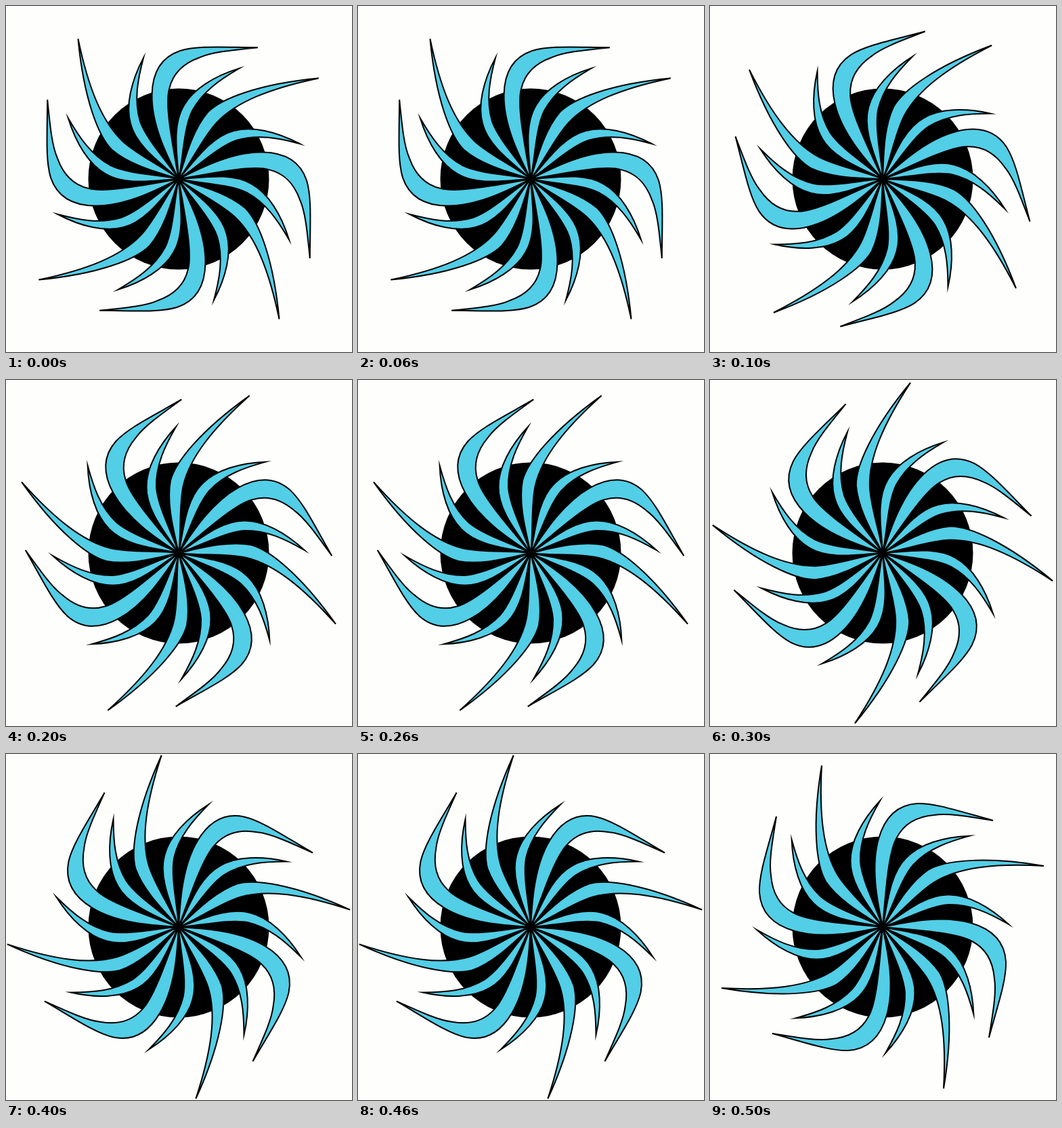
An HTML page with a canvas that plays this animation: 511x510 px, repeating every 600 ms.

```html
<!DOCTYPE html>
<html lang="en">
<head>
<meta charset="utf-8">
<title>Spinning pinwheel</title>
<style>
  html, body { margin: 0; width: 100%; height: 100%; overflow: hidden; background: #fefefc; }
  canvas { display: block; }
</style>
</head>
<body>
<canvas id="stage" width="511" height="510"></canvas>
<script>
const ctx = document.getElementById('stage').getContext('2d');
const STEP_MS = 100, STEPS = 6, STEP_ANGLE = Math.PI / 12;

// Blades start and end at the hub: outer edge to the tip, inner edge back.
const hook = new Path2D(`M0 0
  C-6 -30 -19 -85 -6 -130 C2 -158 18 -180 51 -182 C78 -183 115 -170 163 -157
  C120 -164 95 -168 76 -165 C52 -163 32 -153 21 -132 C9 -112 5 -60 0 0Z`);
const lance = new Path2D(`M0 0
  C-28 -18 -64 -38 -84 -67 C-98 -91 -105 -150 -90 -238
  C-94 -165 -88 -112 -66 -76 C-50 -50 -18 -24 0 0Z`);
const thorn = new Path2D(`M0 0
  C-18 -28 -48 -62 -47.5 -97 C-48 -125 -30 -158 -4 -186
  C-20 -158 -34 -130 -33 -97 C-31 -68 -8 -26 0 0Z`);

function ring(blade, count) {
  for (let i = 0; i < count; i++) {
    ctx.fill(blade);
    ctx.stroke(blade);
    ctx.rotate(2 * Math.PI / count);
  }
}

function draw(ms) {
  const step = Math.floor(ms / STEP_MS) % STEPS;
  ctx.setTransform(1, 0, 0, 1, 0, 0);
  ctx.fillStyle = '#fefefc';
  ctx.fillRect(0, 0, 511, 510);

  ctx.translate(255, 255);
  ctx.fillStyle = '#000';
  ctx.beginPath();
  ctx.arc(0, 0, 133.5, 0, 2 * Math.PI);
  ctx.fill();

  ctx.rotate(-(step + 1) * STEP_ANGLE);
  ctx.fillStyle = '#52cee6';
  ctx.strokeStyle = '#000';
  ctx.lineWidth = 2;
  ctx.miterLimit = 12;
  ring(thorn, 8);
  ring(lance, 4);
  ring(hook, 4);
}

const start = performance.now();
function tick() {
  draw(performance.now() - start);
  requestAnimationFrame(tick);
}
tick();
</script>
</body>
</html>
```
